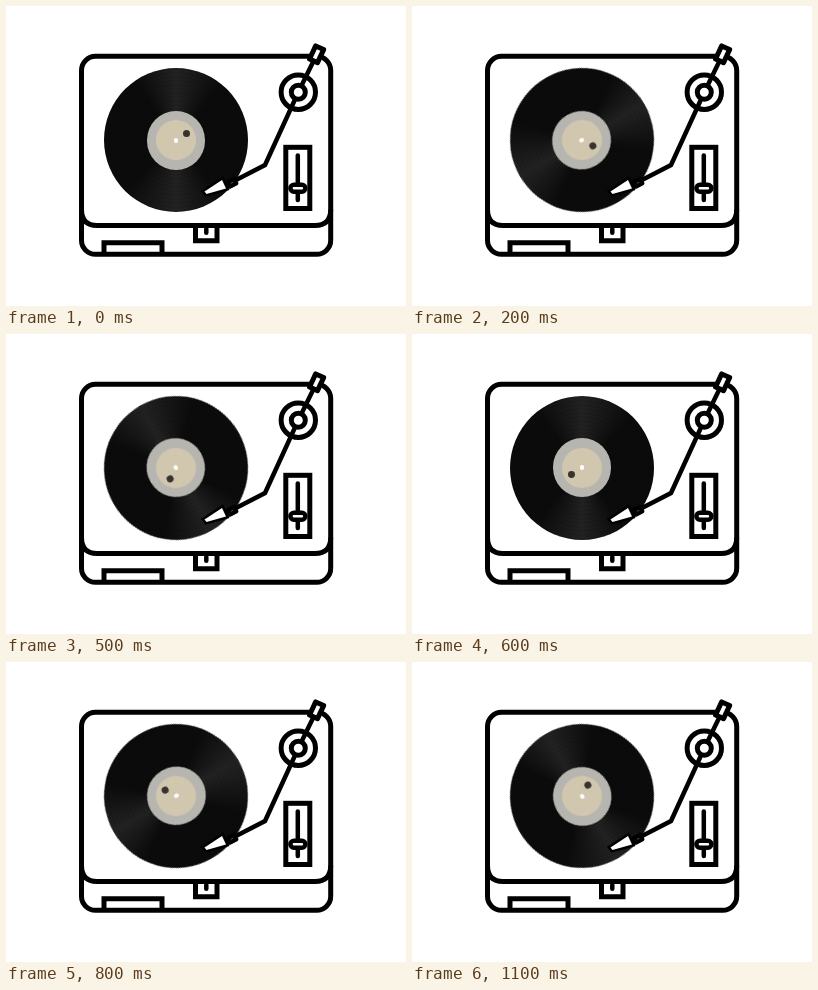
An HTML page that plays this animation: 400x300 px, repeating every 1200 ms.

```html
<!DOCTYPE html>
<html lang="en">
<head>
<meta charset="utf-8">
<title>Turntable</title>
<style>
  html, body { margin: 0; width: 100%; height: 100%; overflow: hidden; background: #fff; }
  .stage { position: relative; width: 400px; height: 300px; overflow: hidden; }
  svg { position: absolute; inset: 0; display: block; }
  .line { fill: none; stroke: #000; stroke-width: 5; }
  .solid { fill: #fff; }
  .round { stroke-width: 4.5; stroke-linecap: round; stroke-linejoin: round; }

  /* The disc sits slightly off its axle, so it wobbles as it turns. */
  .spin {
    position: absolute; left: 98.3px; top: 62.3px; width: 144px; height: 144px;
    animation: spin 1.2s steps(12) infinite;
  }
  .disc, .label, .inner, .mark, .hole { position: absolute; border-radius: 50%; }
  .disc {
    inset: 0.3px 0 -0.3px;
    background:
      repeating-radial-gradient(circle, #0000 0 2px, #0002 3px, #0000 4px),
      conic-gradient(#222, #0b0b0b 40deg 140deg, #222 180deg, #0b0b0b 225deg 325deg, #222);
  }
  .label { inset: 42.7px; background: #b7b5b0; }
  .inner { inset: 52px; background: #d1c7af; }
  .mark { left: 79px; top: 62px; width: 7px; height: 7px; background: #37342e; }
  .hole { inset: 69.8px; background: #fff; }
  @keyframes spin { to { transform: rotate(360deg); } }
</style>
</head>
<body>
<div class="stage">
  <svg width="400" height="300" class="line">
    <rect x="75.5" y="50.3" width="249.2" height="198" rx="14"/>
    <path d="M75.5 203.4Q75.5 219.4 91 219.4H309Q324.7 219.4 324.7 203.4"/>
    <path d="M98 248.3V236.8H156V248.3"/>
    <path d="M189.5 219.4V234.7H211V219.4"/>
    <path class="round" d="M200.3 223V226.8"/>
    <rect x="279.8" y="141.3" width="24" height="61.2"/>
    <path class="round" d="M291.8 149.5V194"/>
    <rect class="solid round" x="284.4" y="178.8" width="15" height="7" rx="3.5"/>
  </svg>

  <div class="spin">
    <div class="disc">
      <div class="label"></div>
      <div class="inner"></div>
      <div class="mark"></div>
      <div class="hole"></div>
    </div>
  </div>

  <svg width="400" height="300" class="line">
    <circle class="solid" cx="292.3" cy="86.2" r="17.2"/>
    <path d="M308 54L292.3 86.2L259 159L229 174.5" stroke-width="4.5"/>
    <circle class="solid" cx="292.3" cy="86.2" r="7"/>
    <rect class="solid" x="-4.4" y="-7.2" width="8.8" height="14.4" stroke-linejoin="round"
      transform="translate(310.6 48.3) rotate(25)"/>
    <path class="solid" d="M198.5 185.5L216 174L220 182.5L200.5 188Z" paint-order="stroke"/>
    <rect class="solid round" x="-3.5" y="-2.4" width="7" height="4.8"
      transform="translate(226 176.7) rotate(-27)"/>
  </svg>
</div>
</body>
</html>
```
